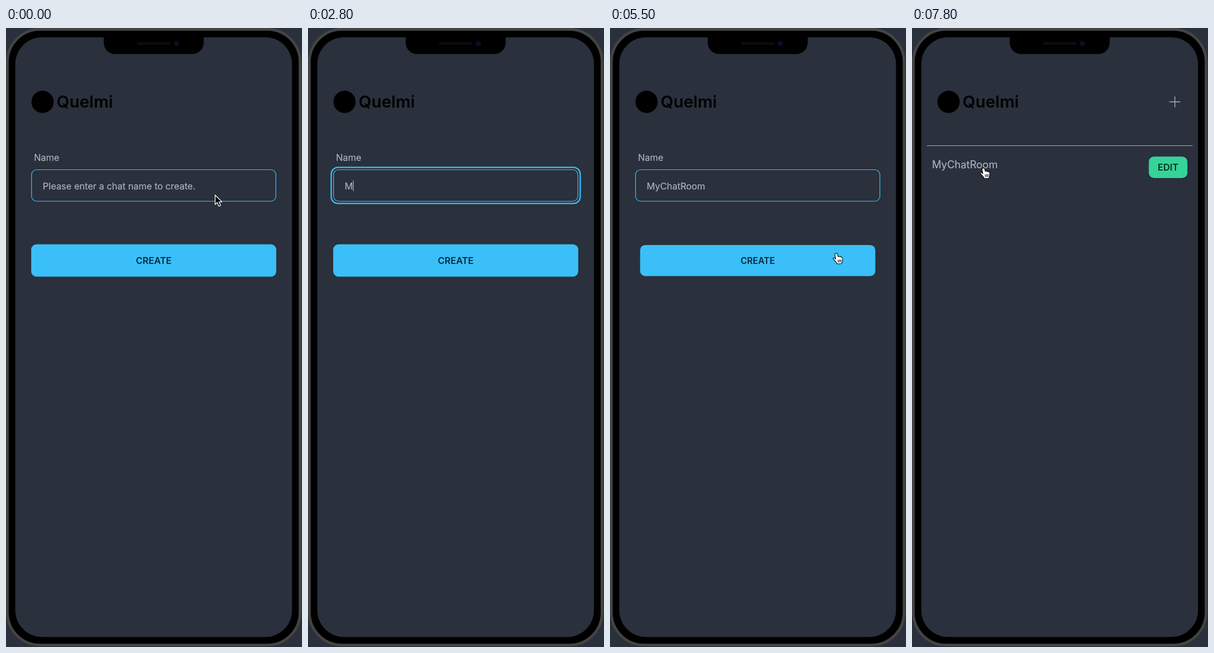
An HTML page for the animation above (8 s loop, 518 px wide and 1081 px high).

```html
<!DOCTYPE html>
<html lang="en">
<head>
<meta charset="utf-8">
<title>Chat room</title>
<style>
  html, body { margin: 0; width: 100%; height: 100%; overflow: hidden; background: #2a303c; }
  svg { display: block; width: 100vw; height: 100vh; }
  text { font: 16px Inter, "Open Sans", sans-serif; fill: #adb4c2; stroke: #adb4c2; stroke-width: .15; white-space: pre; }
  .bold { font-weight: 600; stroke: none; }
  .mid { text-anchor: middle; }
</style>
</head>
<body>
<svg viewBox="0 0 518 1081">
  <defs>
    <path id="beamShape" d="M-3.6-8.5Q-.4-8.5 .3-6.3Q1-8.5 4.2-8.5M.3-6.3V7.3M-2 3.8H2.6M-3.6 9.5Q-.4 9.5 .3 7.3Q1 9.5 4.2 9.5"/>
  </defs>

  <!-- phone -->
  <rect x="2.4" y="2.4" width="512.2" height="1075.2" rx="57" stroke="#444" stroke-width="4.7"/>
  <rect x="16.3" y="16.3" width="484.2" height="1047.2" rx="46.6" fill="#2a303c"/>
  <path d="M171 16H346V25.5a20 20 0 0 1-20 20H191a20 20 0 0 1-20-20Z"/>
  <rect x="229" y="24.5" width="59" height="5" rx="2.5" fill="#0c0b0e"/>
  <circle cx="298" cy="27" r="4.7" fill="#0f0b25"/>

  <!-- brand -->
  <circle cx="64" cy="129" r="19.5"/>
  <text x="88.5" y="139" class="bold" style="font-size:29px;fill:#000">Quelmi</text>

  <g id="form">
    <text x="49" y="232">Name</text>
    <rect id="ring" x="40.6" y="243.4" width="435.8" height="63" rx="12" fill="none" stroke="#3abff8" stroke-width="2.3"/>
    <rect x="44.7" y="247.5" width="427.6" height="55" rx="8.8" fill="none" stroke="#3abff8" stroke-width="1.2"/>
    <text id="field" x="64.3" y="281.6"></text>
    <rect id="caret" y="266" width="1.2" height="19" fill="#a6adbb"/>
    <g id="create">
      <rect x="44.1" y="377.8" width="428.8" height="56.5" rx="9.3" fill="#3abff8"/>
      <text x="258.5" y="412" class="bold mid" style="fill:#002b3d">CREATE</text>
    </g>
  </g>

  <g id="list">
    <path d="M450.5 129H469.5M460 119.5V138.5" stroke="#a6adbb" stroke-width="1.4"/>
    <path d="M26 205.5H491" stroke="#a6adbb"/>
    <text x="35" y="245" style="font-size:18px">MyChatRoom</text>
    <rect x="414.4" y="224.4" width="67.5" height="37.6" rx="9.3" fill="#36d399"/>
    <text x="448.2" y="249" class="bold mid" style="fill:#003320">EDIT</text>
  </g>

  <!-- pointers, hotspot at 0,0 -->
  <g id="pointer" stroke-linejoin="round" stroke-linecap="round">
    <path id="arrow" d="M0 .8V17.2L3.7 13.7L6.4 20.2L9.5 18.9L6.8 12.6H11.8Z" stroke="#fff" stroke-width="1.3"/>
    <g id="beam" fill="none">
      <use href="#beamShape" stroke="#fff" stroke-width="3.2"/>
      <use href="#beamShape" stroke="#000" stroke-width="1.2"/>
    </g>
    <g id="hand" transform="translate(-6.2 -1)" stroke="#000" stroke-width="1.1">
      <path d="M5 1.5C6.5 .3 8 .8 8.4 2.4L9.6 7C10.5 5.8 12 6 12.4 7.2C13.4 6.4 14.8 6.8 15 8C16.3 7.4 17.4 8.3 17.3 9.8L17 14C16.9 16 16 17 15.6 19L7.8 19.5C7 17 3 13 1 10.8C.2 9.6 1.6 8.2 3 9L5.2 10.8L3.8 4C3.5 2.8 4 2 5 1.5Z" fill="#fff"/>
      <path d="M9.4 12.5L9.7 16.3M11.8 12.3L12 16.1M14.2 12.1V15.9"/>
    </g>
  </g>
</svg>
<script>
const LOOP = 8000, STEP = 100;
const $ = id => document.getElementById(id);
const show = (id, on) => { $(id).style.display = on ? '' : 'none'; };

const HINT = 'Please enter a chat name to create.';
const typed = [
  [0, ''], [1700, 'm'], [2400, ''], [2700, 'M'], [3000, 'My'], [3300, 'MyC'], [3400, 'MyCh'],
  [3500, 'MyCha'], [3600, 'MyChat'], [4000, 'MyChatR'], [4100, 'MyChatRo'], [4200, 'MyChatRoo'], [4400, 'MyChatRoom']
];
// time, x, y
const path = [
  [0, 366, 291], [4700, 366, 291], [4800, 385, 262], [4900, 425, 233], [5000, 467, 310], [5100, 451, 368],
  [5200, 425, 384], [5300, 403, 392], [5400, 396, 393.5], [6100, 396, 393.5], [6200, 300, 372],
  [6300, 208, 332], [6400, 174, 300], [6600, 142, 262], [6900, 125, 244.5], [LOOP, 125, 244.5]
];

function pointAt(t) {
  const i = path.findIndex(p => p[0] > t);
  const [t0, x0, y0] = path[i - 1], [t1, x1, y1] = path[i];
  const k = (t - t0) / (t1 - t0);
  return [x0 + (x1 - x0) * k, y0 + (y1 - y0) * k];
}

function pointerKind(t, x, y, onList) {
  // after the page change the hand stays until the mouse moves
  if (y > 378 || (onList && y < 268)) return 'hand';
  const inField = x < 472 && y > 247 && y < 303;
  return !onList && t >= 100 && inField ? 'beam' : 'arrow';
}

function draw(t) {
  const onList = t >= 5600;
  show('form', !onList);
  show('list', onList);

  const text = typed.filter(k => k[0] <= t).pop()[1];
  const field = $('field');
  field.textContent = text || HINT;
  show('ring', t >= 1100 && t < 5500);
  show('caret', t >= 1100 && t < 4900);
  const end = text && !onList ? field.getComputedTextLength() : 0;
  $('caret').setAttribute('x', 64.3 + end);

  const scale = t >= 5500 ? 0.96 : 1;
  $('create').setAttribute('transform', `translate(258.5 406) scale(${scale}) translate(-258.5 -406)`);

  const [x, y] = pointAt(t);
  const kind = pointerKind(t, x, y, onList);
  show('pointer', t < 1700 || t >= 4700);
  for (const id of ['arrow', 'beam', 'hand']) show(id, id === kind);
  $('pointer').setAttribute('transform', `translate(${x} ${y})`);
}

const start = performance.now();
function tick() {
  const t = (performance.now() - start) % LOOP;
  draw(Math.floor(t / STEP) * STEP);
  requestAnimationFrame(tick);
}
tick();
</script>
</body>
</html>
```
